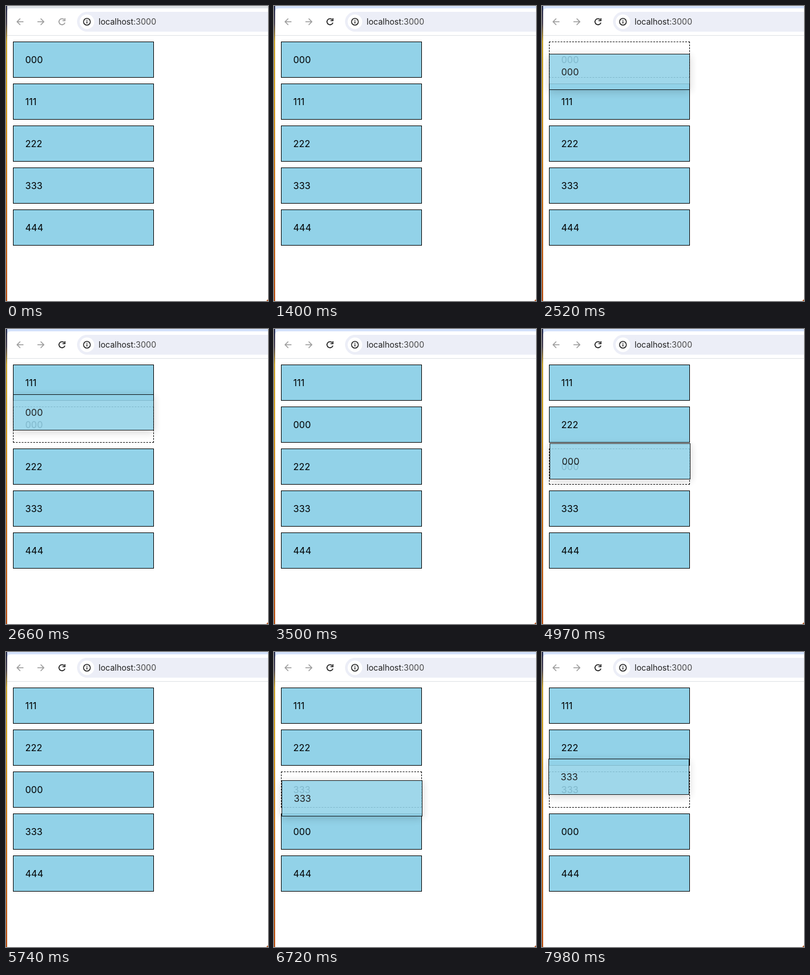
Write an HTML page that moves like this. It is 450 by 506 pixels and loops after 8 s.

```html
<!DOCTYPE html>
<html lang="en">
<head>
<meta charset="utf-8">
<title>Sortable list</title>
<style>
  html, body { margin: 0; width: 100%; height: 100%; overflow: hidden; background: #fff; }
  svg { position: absolute; left: 0; top: 0; }
  .url { font: 14px Inter, "Liberation Sans", sans-serif; fill: #1f1f1f; }
  .item {
    position: absolute; left: 12px; box-sizing: border-box; width: 242px; height: 62px;
    padding: 20px; border: 1px solid #000; background: #92d2e8; color: #000;
    font: 16px/20px Inter, "Liberation Sans", sans-serif;
  }
  .empty { background: #fff; border-style: dashed; }
  #ghost { left: 0; top: 0; opacity: .88; box-shadow: 0 3px 14px rgba(0, 0, 0, .2); }
</style>
</head>
<body>
<svg width="450" height="506" fill="none">
  <defs>
    <linearGradient id="desk" x1="0" y1="0" x2="0" y2="1">
      <stop offset="0" stop-color="#22284a"/>
      <stop offset=".06" stop-color="#4a4250"/>
      <stop offset=".12" stop-color="#c9a227"/>
      <stop offset=".3" stop-color="#d3a01c"/>
      <stop offset=".6" stop-color="#cc7414"/>
      <stop offset="1" stop-color="#b84d10"/>
    </linearGradient>
  </defs>
  <rect width="450" height="506" fill="url(#desk)"/>
  <path id="strip" d="M2 0H450V12H2z"/>
  <path d="M2 506V10Q2 4 8 4H450V503L447 506z" fill="#fff"/>
  <path d="M2 50.5H450" stroke="#dfe1e5"/>
  <rect x="122" y="10" width="360" height="34" rx="17" fill="#eceef7"/>
  <circle cx="139" cy="27" r="12.5" fill="#fff"/>
  <g stroke="#9b9b9b" stroke-width="1.5">
    <path d="M30 27H19M24.5 21.5L19 27L24.5 32.5"/>
    <path d="M54 27H65M59.5 21.5L65 27L59.5 32.5"/>
  </g>
  <g id="reload" stroke-width="1.6">
    <path d="M100.2 23.6A5.2 5.2 0 1 0 101.2 28.4"/>
    <path d="M101.3 21V25.2H97"/>
  </g>
  <circle cx="139" cy="27" r="5.8" stroke="#1f1f1f" stroke-width="1.5"/>
  <path d="M139 26.3V30M139 23.7V25.2" stroke="#1f1f1f" stroke-width="1.5"/>
  <text class="url" x="159" y="32">localhost<tspan fill="#474747">:3000</tspan></text>
</svg>
<div id="list"></div>
<div id="ghost" class="item"></div>
<script>
const LOOP = 8000, TICK = 70, FOCUS = 1400;
const $ = id => document.getElementById(id);

// Each drag: item, upper slot of the swapped pair, swap and drop times, path of [time, x, y]
const drags = [
  { item: 0, slot: 0, swap: 2660, drop: 3500,
    path: [[2520, 12, 82], [2660, 12, 112], [2800, 14, 129], [2940, 16, 135]] },
  { item: 0, slot: 1, swap: 4760, drop: 5740,
    path: [[4550, 11, 148], [4690, 11, 168], [4830, 12, 186], [4970, 13, 196],
           [5180, 13, 196], [5320, 13, 201], [5390, 13, 201], [5460, 13, 203]] },
  { item: 3, slot: 2, swap: 6440, drop: 7350,
    path: [[6440, 10, 243], [6580, 14, 222], [6650, 14, 222], [6720, 13, 220], [6860, 13, 211]] },
  { item: 3, slot: 2, swap: Infinity, drop: LOOP, path: [[7980, 11, 183]] }
];

const slots = Array.from({ length: 5 }, (_, i) => {
  const el = $('list').appendChild(document.createElement('div'));
  el.style.top = 61 + 72 * i + 'px';
  return el;
});

const label = n => String(n).repeat(3);

function along(path, t) {
  const i = path.findIndex(p => p[0] > t);
  if (i < 0) return path[path.length - 1].slice(1);
  const [a, b] = [path[i - 1], path[i]];
  const k = (t - a[0]) / (b[0] - a[0]);
  return [1, 2].map(j => Math.round(a[j] + (b[j] - a[j]) * k));
}

function draw(ms) {
  const t = Math.floor(ms % LOOP / TICK) * TICK;
  const active = t >= FOCUS;
  $('strip').setAttribute('fill', active ? '#d3e1fb' : '#dee1e6');
  $('reload').setAttribute('stroke', active ? '#1f1f1f' : '#9b9b9b');

  const order = [0, 1, 2, 3, 4];
  for (const { slot: s, swap } of drags)
    if (t >= swap) [order[s], order[s + 1]] = [order[s + 1], order[s]];

  const drag = drags.find(d => t >= d.path[0][0] && t < d.drop);
  slots.forEach((el, i) => {
    el.textContent = label(order[i]);
    el.className = drag && drag.item === order[i] ? 'item empty' : 'item';
  });

  const ghost = $('ghost');
  ghost.style.display = drag ? '' : 'none';
  if (drag) {
    const [x, y] = along(drag.path, t);
    ghost.textContent = label(drag.item);
    ghost.style.left = x + 'px';
    ghost.style.top = y + 'px';
  }
}

const start = performance.now();
function frame() {
  draw(performance.now() - start);
  requestAnimationFrame(frame);
}
frame();
</script>
</body>
</html>
```
